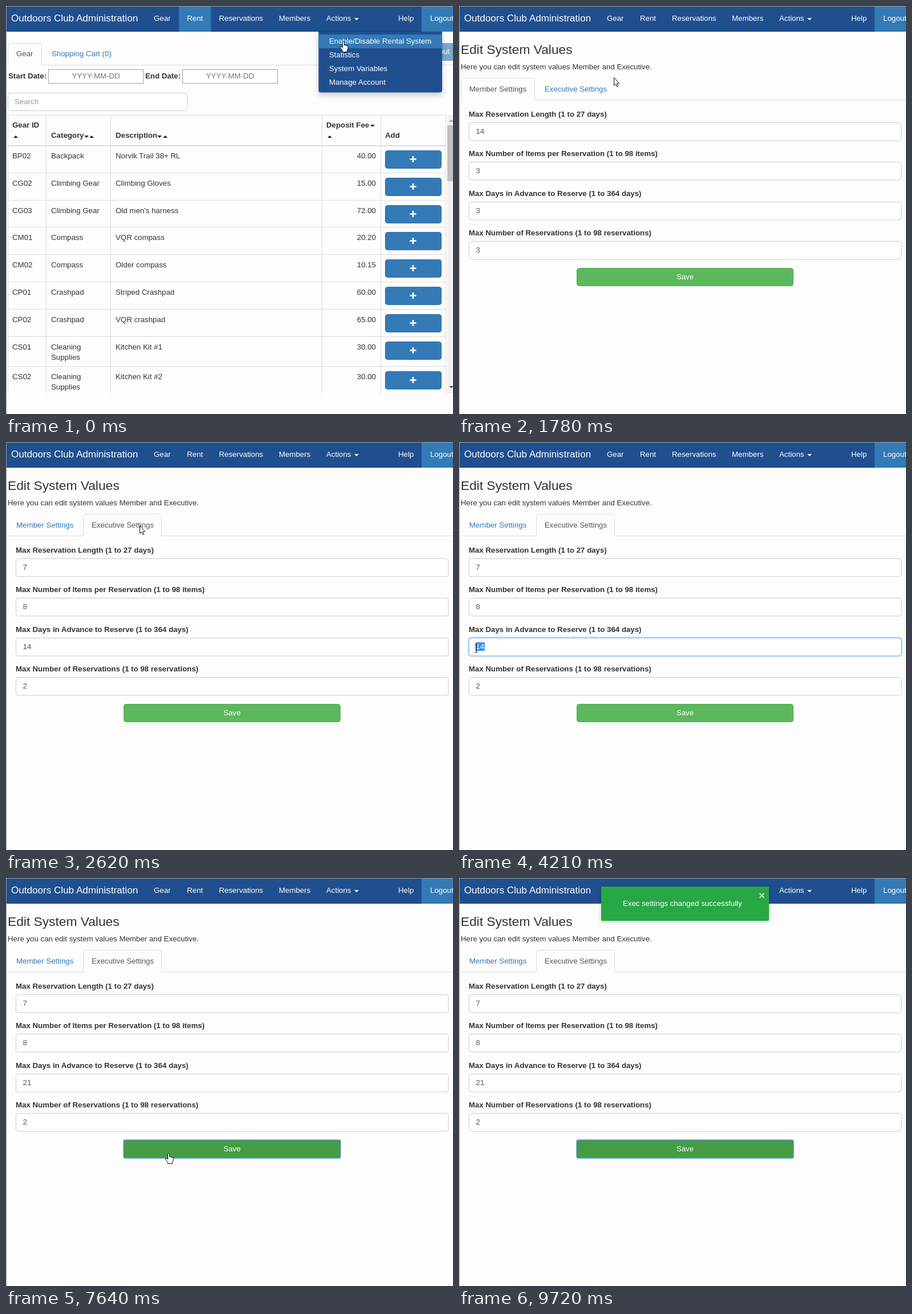
These frames come from a looping animation (783x715 px, 9.97 s). An HTML page:

```html
<!DOCTYPE html>
<html lang="en">
<head>
<meta charset="utf-8">
<title>Outdoors Club Administration</title>
<style>
  html, body { margin: 0; width: 100%; height: 100%; overflow: hidden; background: #fdfdfd; }
  svg { display: block; width: 783px; height: 715px; }
  text { font: 13.27px "Liberation Sans", Arial, sans-serif; white-space: pre; }
  .b { font-weight: bold; }
  #menu { filter: drop-shadow(0 5px 5px rgba(0, 0, 0, .2)); }
  #toast { filter: drop-shadow(0 1px 3px rgba(0, 0, 0, .25)); }
  #glow { filter: blur(1.3px); }
</style>
</head>
<body>
<script>
const NS = 'http://www.w3.org/2000/svg';
const BLUE = '#337ab7', NAVY = '#1f4f8f', INK = '#333', LINE = '#ddd';
const LOOP = 9970;

function el(parent, tag, attrs = {}, text) {
  const node = document.createElementNS(NS, tag);
  for (const k in attrs) node.setAttribute(k, attrs[k]);
  if (text !== undefined) node.textContent = text;
  return parent.appendChild(node);
}
const group = (parent, id) => el(parent, 'g', id ? { id } : {});
const label = (g, x, y, s, fill = INK, more = {}) => el(g, 'text', { x, y, fill, ...more }, s);
const bold = (g, x, y, s) => label(g, x, y, s, INK, { class: 'b' });
const fillBox = (g, x, y, w, h, fill, rx = 0) => el(g, 'rect', { x, y, width: w, height: h, fill, rx });
const frame = (g, x, y, w, h, stroke, fill = '#fff', rx = 4) =>
  el(g, 'rect', { x: x + .5, y: y + .5, width: w - 1, height: h - 1, rx, stroke, fill });
const path = (g, d, more) => el(g, 'path', { d, ...more });
const caret = (g, x, y, up, fill = '#222') =>
  path(g, up ? `M${x - 4} ${y + 2}h8l-4-4z` : `M${x - 4} ${y - 2}h8l-4 4z`, { fill });
const show = (node, on) => node.setAttribute('visibility', on ? 'inherit' : 'hidden');

const svg = el(document.body, 'svg', { viewBox: '0 0 783 715' });
fillBox(svg, 0, 0, 783, 715, '#fdfdfd');

// Navigation bar
const nav = group(svg);
fillBox(nav, 1, 1, 782, 44, NAVY);
fillBox(nav, 1, 44, 782, 1, '#1a4480');
const rentLink = fillBox(nav, 303, 1, 56, 44, BLUE);
fillBox(nav, 728, 1, 55, 44, BLUE);
label(nav, 9, 27, 'Outdoors Club Administration', '#fff', { style: 'font-size:17.08px' });
[['Gear', 259], ['Rent', 317], ['Reservations', 373], ['Members', 478], ['Actions', 561],
 ['Help', 687], ['Logout', 743]].forEach(([s, x]) => label(nav, x, 26, s, '#fff'));
caret(nav, 614, 23, false, '#fff');

function tabShape(g, x, y, w, stroke, fill) {
  return path(g, `M${x + .5} ${y + 39}V${y + 4.5}q0-4 4-4h${w - 9}q4 0 4 4V${y + 39}`, { stroke, fill });
}

// Rental page
const rent = group(svg);
frame(rent, 709, 65, 81, 31, '#78a3cb', '#7aa7d0');
label(rent, 777, 84, 'Checkout', '#fff', { 'text-anchor': 'end' });
fillBox(rent, 3, 103, 780, 1, LINE);
tabShape(rent, 3, 65, 60, LINE, '#fdfdfd');
label(rent, 18, 88, 'Gear', '#555');
label(rent, 80, 88, 'Shopping Cart (0)', BLUE);
[['Start Date:', 4, 74], ['End Date:', 244, 309]].forEach(([s, x, bx]) => {
  bold(rent, x, 127, s);
  frame(rent, bx, 111, 167, 25, '#a0a0a0', '#fff', 0);
  label(rent, bx + 83.5, 127, 'YYYY-MM-DD', '#757575', { 'text-anchor': 'middle' });
});
frame(rent, 3, 152, 315, 32, '#ccc');
label(rent, 15, 172, 'Search', '#999');

const table = el(rent, 'svg', { width: 783, height: 679 });
[3, 70, 183, 553, 656, 770].forEach(x => fillBox(table, x, 191, 1, 488, LINE));
fillBox(table, 3, 191, 768, 1, LINE);
fillBox(table, 3, 244, 768, 2, LINE);
bold(table, 11, 213, 'Gear ID');
caret(table, 17, 229, true);
bold(table, 79, 231, 'Category');
caret(table, 141, 229); caret(table, 150, 229, true);
bold(table, 192, 231, 'Description');
caret(table, 269, 229); caret(table, 279, 229, true);
bold(table, 561, 213, 'Deposit Fee');
caret(table, 642, 210); caret(table, 567, 229, true);
bold(table, 664, 231, 'Add');

const stock = [
  ['BP02', 'Backpack', 'Norvik Trail 38+ RL', '40.00'],
  ['CG02', 'Climbing Gear', 'Climbing Gloves', '15.00'],
  ['CG03', 'Climbing Gear', "Old men's harness", '72.00'],
  ['CM01', 'Compass', 'VQR compass', '20.20'],
  ['CM02', 'Compass', 'Older compass', '10.15'],
  ['CP01', 'Crashpad', 'Striped Crashpad', '60.00'],
  ['CP02', 'Crashpad', 'VQR crashpad', '65.00'],
  ['CS01', 'Cleaning Supplies', 'Kitchen Kit #1', '30.00'],
  ['CS02', 'Cleaning Supplies', 'Kitchen Kit #2', '30.00']
];
stock.forEach(([id, kind, name, fee], i) => {
  const top = Math.round(245 + 47.8 * i + (i > 7 ? 5 : 0)), y = top + 22;
  if (i) fillBox(table, 3, top - 1, 768, 1, LINE);
  label(table, 11, y, id);
  const lines = kind.startsWith('Cleaning') ? kind.split(' ') : [kind];
  lines.forEach((s, n) => label(table, 79, y + 18 * n, s));
  label(table, 192, y, name);
  label(table, 648, y, fee, INK, { 'text-anchor': 'end' });
  frame(table, 664, top + 8, 99, 32, '#2e6da4', BLUE);
  path(table, `M707.5 ${top + 23.5}h11m-5.5-5.5v11`, { stroke: '#fff', 'stroke-width': 2.6 });
});

fillBox(rent, 773, 191, 10, 488, '#f1f1f1');
fillBox(rent, 773, 209, 10, 98, '#c1c1c1');
caret(rent, 780, 201, true, '#a3a3a3');
caret(rent, 780, 668, false, '#505050');

const menu = group(rent, 'menu');
path(menu, 'M547.5 45H764V147.5q0 4-4 4H551.5q-4 0-4-4z', { fill: NAVY });
const menuHover = fillBox(menu, 547.5, 50, 216.5, 24, BLUE);
['Enable/Disable Rental System', 'Statistics', 'System Variables', 'Manage Account']
  .forEach((s, i) => label(menu, 566, 66 + 24 * i, s, '#fff'));

// Settings page
const form = group(svg);
label(form, 3, 84, 'Edit System Values', INK, { style: 'font-size:22.75px' });
label(form, 3, 111, 'Here you can edit system values Member and Executive.');
fillBox(form, 3, 164, 780, 1, LINE);
const tabs = [['Member Settings', 3, 130], ['Executive Settings', 135, 138]].map(([s, x, w]) => {
  const hover = path(form, `M${x} 164V130q0-4 4-4h${w - 8}q4 0 4 4V164z`, { fill: '#eee' });
  const active = tabShape(form, x, 126, w, LINE, '#fdfdfd');
  return { hover, active, text: label(form, x + 15, 150, s) };
});

const pane = group(form);
const fieldY = [204, 273, 343, 412];
const fields = ['Max Reservation Length (1 to 27 days)', 'Max Number of Items per Reservation (1 to 98 items)',
  'Max Days in Advance to Reserve (1 to 364 days)', 'Max Number of Reservations (1 to 98 reservations)'
].map((s, i) => {
  const y = fieldY[i];
  bold(pane, 17, y - 10, s);
  const glow = i === 2 && el(pane, 'rect', { id: 'glow', x: 16.5, y: y - .5, width: 759, height: 32.5, rx: 5,
    fill: 'none', stroke: '#66afe9', 'stroke-width': 2, opacity: .5 });
  const box = frame(pane, 17, y, 758.5, 32.4, '#ccc');
  return { glow, box };
});
const marked = fillBox(pane, 29, 351, 16, 15, '#3390ff');
fields.forEach((f, i) => { f.text = label(pane, 29.5, fieldY[i] + 20, '', '#555'); });
const tens = el(fields[2].text, 'tspan'), units = el(fields[2].text, 'tspan');
const bar = fillBox(pane, 44, 351, 1, 15, '#333');
const save = frame(pane, 206, 459, 380, 32, '#4cae4c', '#5cb85c');
const ring = el(pane, 'rect', { x: 206, y: 459, width: 380, height: 32, rx: 3, fill: 'none',
  stroke: '#5b9bd0', 'stroke-width': 1.4 });
label(pane, 396, 479, 'Save', '#fff', { 'text-anchor': 'middle' });

const toast = group(svg, 'toast');
fillBox(toast, 249, 15, 294, 60, '#28a745', 2);
label(toast, 287, 49, 'Exec settings changed successfully', '#fff');
label(toast, 530.5, 37, '×', '#c3e8cb', { class: 'b', style: 'font-size:19px', 'text-anchor': 'middle' });

fillBox(svg, 0, 0, 1, 715, '#a0a0a0');
fillBox(svg, 0, 0, 783, 1, '#a0a0a0');

// Mouse pointers
const mouse = group(svg);
const outline = { fill: '#fff', stroke: '#111', 'stroke-width': 1, 'stroke-linejoin': 'round' };
const pointers = {
  arrow: path(mouse, 'M.5.5V14.5L3.6 11.7 5.7 16.4 7.7 15.5 5.6 10.8H9.8z', outline),
  hand: path(mouse, 'M-1.5 1.5Q0-.8 1.5 1.5V7Q3 5.6 4 7.3 5.5 6.3 6.2 8 8 7.3 8 9.5V13L6.3 16V18.5H-1.5V16.5L-5.5 11Q-6 8.5-3.5 9.3L-1.5 11z', outline),
  beam: path(mouse, 'M-2.5-7h1.5L0-6.3 1-7h1.5M0-6.3V6.3M-2.5 7h1.5L0 6.3 1 7h1.5', { fill: 'none', stroke: '#111' })
};

// Pointer legs: first change, last change, number of jumps, goal
const legs = [
  [150, 430, 3, 589, 107],
  [1120, 1780, 6, 271, 125],
  [1930, 2080, 2, 234, 146],
  [2770, 3160, 4, 60, 280],
  [3310, 3700, 4, 46, 360],
  [3830, 4210, 4, 29.5, 362],
  [4610, 4730, 2, 11, 355],
  [6650, 7360, 6, 285, 482],
  [8490, 9050, 5, 470, 582],
  [9180, 9580, 4, 706, 704]
];
const ease = p => p * p * (3 - 2 * p);

function pointerAt(t) {
  let x = 591, y = 62;
  for (const [from, to, n, gx, gy] of legs) {
    if (t < from) break;
    const jump = (to - from) / (n - 1);
    const i = Math.min(n, Math.floor((t - from) / jump + 1e-6) + 1);
    const p = ease(i / n);
    x += (gx - x) * p;
    y += (gy - y) * p;
  }
  return [x, y];
}

const within = (x, y, l, t, r, b) => x >= l && x < r && y >= t && y < b;

function render(t) {
  const [x, y] = pointerAt(t);
  const onForm = t >= 700, exec = t >= 2200;
  show(rent, !onForm);
  show(form, onForm);
  show(rentLink, !onForm);
  const row = Math.max(0, Math.min(3, Math.floor((y - 50) / 24)));
  menuHover.setAttribute('y', 50 + 24 * row);

  const overTab = onForm && !exec && within(x, y, 135, 126, 273, 164);
  tabs.forEach((tab, i) => {
    const active = i === +exec;
    show(tab.active, onForm && active);
    show(tab.hover, onForm && i === 1 && overTab);
    tab.text.setAttribute('fill', active ? '#555' : BLUE);
  });
  pane.setAttribute('opacity', t >= 2200 && t < 2340 ? .4 : 1);

  const values = exec ? ['7', '8', '14', '2'] : ['14', '3', '3', '3'];
  if (t >= 5410) values[2] = t < 5660 ? '2' : '21';
  fields.forEach((f, i) => { if (i !== 2) f.text.textContent = values[i]; });
  tens.textContent = values[2][0];
  units.textContent = values[2][1] || '';

  const focus = t >= 3700 && t < 7500;
  show(fields[2].glow, onForm && focus);
  fields[2].box.setAttribute('stroke', focus ? '#66afe9' : '#ccc');
  const picked = t >= 3960 && t < 5410 ? (t < 4090 ? 1 : 2) : 0;
  show(marked, picked > 0);
  marked.setAttribute('x', picked === 1 ? 37 : 29);
  marked.setAttribute('width', picked === 1 ? 8 : 16);
  tens.setAttribute('fill', picked === 2 ? '#fff' : '#555');
  units.setAttribute('fill', picked ? '#fff' : '#555');
  show(bar, t >= 5410 && t < 6250);
  bar.setAttribute('x', t < 5660 ? 37 : 44);

  const overSave = onForm && within(x, y, 206, 459, 586, 491);
  const pressed = t >= 7500;
  save.setAttribute('fill', overSave || pressed ? '#449d44' : '#5cb85c');
  save.setAttribute('stroke', overSave || pressed ? '#398439' : '#4cae4c');
  show(ring, pressed);

  show(toast, t >= 8070);
  toast.setAttribute('opacity', t < 8210 ? .35 : t < 8350 ? .75 : 1);

  const overField = onForm && fieldY.some(top => within(x, y, 17, top, 776, top + 32));
  const kind = !onForm || overTab || overSave ? 'hand' : overField ? 'beam' : 'arrow';
  for (const k in pointers) show(pointers[k], k === kind);
  show(mouse, t < 9720);
  mouse.setAttribute('transform', `translate(${Math.round(x)} ${Math.round(y)})`);
}

const start = performance.now();
function tick() {
  render((performance.now() - start) % LOOP);
  requestAnimationFrame(tick);
}
render(0);
requestAnimationFrame(tick);
</script>
</body>
</html>
```
